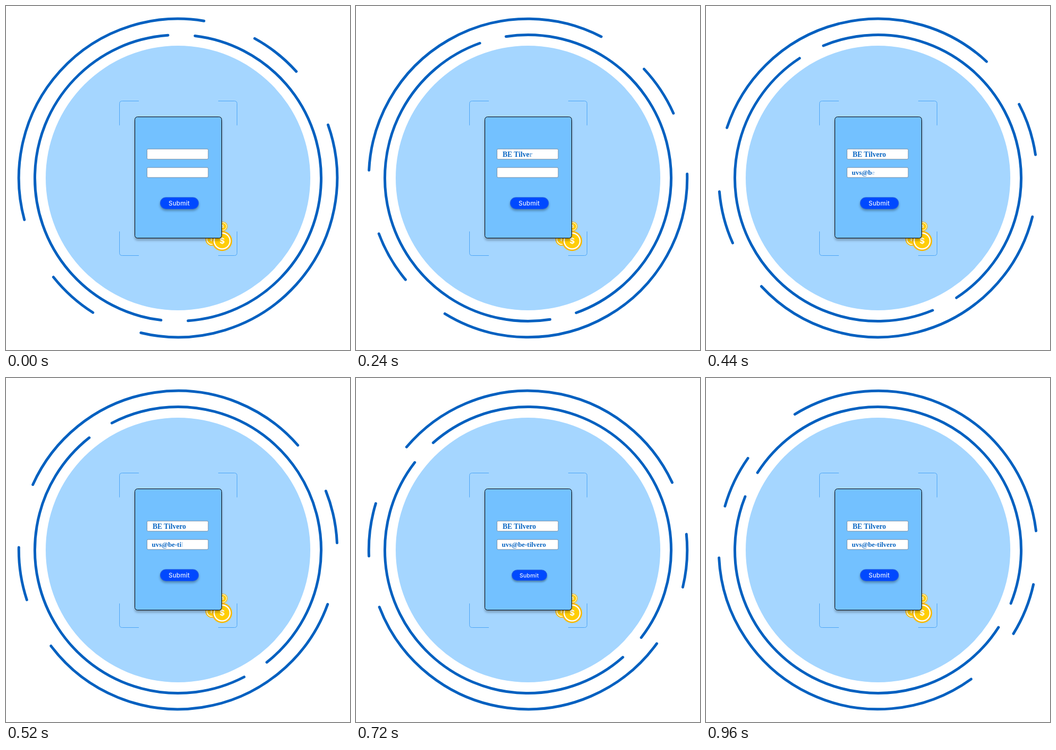
An HTML page that plays this animation: 650 by 650 pixels, repeating every 1 s.

```html
<!DOCTYPE html>
<html lang="en">
<head>
<meta charset="utf-8">
<title>Form submit</title>
<style>
  html, body { margin: 0; width: 100%; height: 100%; overflow: hidden; background: #fff; }
  svg { display: block; width: 100%; height: 100%; }
  .ring { fill: none; stroke: #0060c0; stroke-width: 5; stroke-linecap: round; }
  .frame { fill: none; stroke: #4ca5f6; }
  .field { fill: #fff; stroke: #6d7f92; stroke-width: .8; }
  .typed { font-family: "Liberation Serif", "Times New Roman", serif; font-weight: 700; fill: #0a66c2; }
  .coin text { font: 700 15px Inter, sans-serif; fill: #fff; text-anchor: middle; }
  .label { font: 500 11.6px Inter, sans-serif; letter-spacing: .2px; fill: #e9efff; text-anchor: middle; }
  .card { filter: drop-shadow(0 4px 2px rgba(0, 0, 0, .27)); }
  #button { filter: drop-shadow(0 3px 2px rgba(0, 0, 0, .3)); }
</style>
</head>
<body>
<svg viewBox="0 0 650 650">
  <defs>
    <g id="coin" class="coin">
      <circle r="19" fill="#f9b900"/>
      <circle r="15" fill="#ffcd05" stroke="#fff" stroke-width="2.4"/>
      <text y="5.3">$</text>
    </g>
  </defs>
  <path id="outer" class="ring"/>
  <path id="inner" class="ring"/>
  <circle cx="325" cy="325" r="250" fill="#a5d6ff"/>
  <path class="frame" d="M251 179.5H219.5Q214.5 179.5 214.5 184.5V225.5
    M401 179.5H431.5Q436.5 179.5 436.5 184.5V225.5
    M251 471.5H219.5Q214.5 471.5 214.5 466.5V426
    M401 471.5H431.5Q436.5 471.5 436.5 466.5V426"/>
  <use href="#coin" transform="translate(409.5 416.5) scale(.48)"/>
  <use href="#coin" transform="translate(389 441) scale(.64)"/>
  <use href="#coin" transform="translate(408.3 444)"/>
  <rect class="card" x="243.5" y="209.5" width="164" height="229" rx="5" fill="#73c1ff" stroke="#000"/>
  <rect class="field" x="266.5" y="270.2" width="115.5" height="19.2" rx="2"/>
  <rect class="field" x="266.5" y="305.2" width="115.5" height="18.8" rx="2"/>
  <text id="name" class="typed" x="277" y="285" font-size="13.6"></text>
  <text id="mail" class="typed" x="275.5" y="318.5" font-size="12.9"></text>
  <g id="button">
    <rect x="291" y="361.3" width="73.3" height="22.6" rx="11.3" fill="#1c5be6"/>
    <rect x="292.2" y="362.5" width="70.9" height="20.2" rx="10.1" fill="#0049ff"/>
    <text class="label" x="327.2" y="377">Submit</text>
  </g>
</svg>
<script>
const $ = id => document.getElementById(id);
const clamp = v => Math.max(0, Math.min(1, v));

function arc(r, from, to) {
  const point = deg => {
    const a = deg * Math.PI / 180;
    return `${325 + r * Math.cos(a)} ${325 + r * Math.sin(a)}`;
  };
  return `M${point(from)}A${r} ${r} 0 ${+(to - from > 180)} 1 ${point(to)}`;
}

$("outer").setAttribute("d",
  [[164.8, 279.4], [-61.2, -42], [-19.5, 103.5], [122.3, 141.5]]
    .map(([a, b]) => arc(300.8, a, b)).join(""));
$("inner").setAttribute("d", arc(270.5, 96.8, 266) + arc(270.5, -83.2, 86));

// Splits a line into letters that fade in one after another.
function typing(id, text, start, length) {
  const letters = [...text].map(ch => {
    const span = document.createElementNS("http://www.w3.org/2000/svg", "tspan");
    span.textContent = ch;
    $(id).append(span);
    return span;
  });
  return t => letters.forEach((span, i) =>
    span.setAttribute("fill-opacity", clamp((t - start) / length * letters.length - i)));
}
const typeName = typing("name", "BE Tilvero", 0, 281);
const typeMail = typing("mail", "uvs@be-tilvero", 332, 285);

// Rotation in degrees over time; the pace varies slightly.
const turns = [[0, 0], [240, 18], [440, 33.6], [600, 45.3], [720, 55.5], [840, 64.5], [960, 73.7]];
function turn(t) {
  const i = Math.max(1, turns.findIndex(k => t <= k[0]));
  const [t0, a0] = turns[i - 1], [t1, a1] = turns[i];
  return a0 + (a1 - a0) * (t - t0) / (t1 - t0);
}

function draw(now) {
  const t = Math.floor(now % 1000 / 40) * 40;
  const angle = turn(t);
  $("outer").setAttribute("transform", `rotate(${angle} 325 325)`);
  $("inner").setAttribute("transform", `rotate(${-angle * .87} 325 325)`);
  typeName(t);
  typeMail(t);
  const press = 1 - .085 * Math.sin(Math.PI * clamp((t - 630) / 180));
  $("button").setAttribute("transform",
    `translate(327.6 373) scale(${press}) translate(-327.6 -373)`);
}

let begin;
function tick(now) {
  begin ??= now;
  draw(now - begin);
  requestAnimationFrame(tick);
}
draw(0);
requestAnimationFrame(tick);
</script>
</body>
</html>
```
